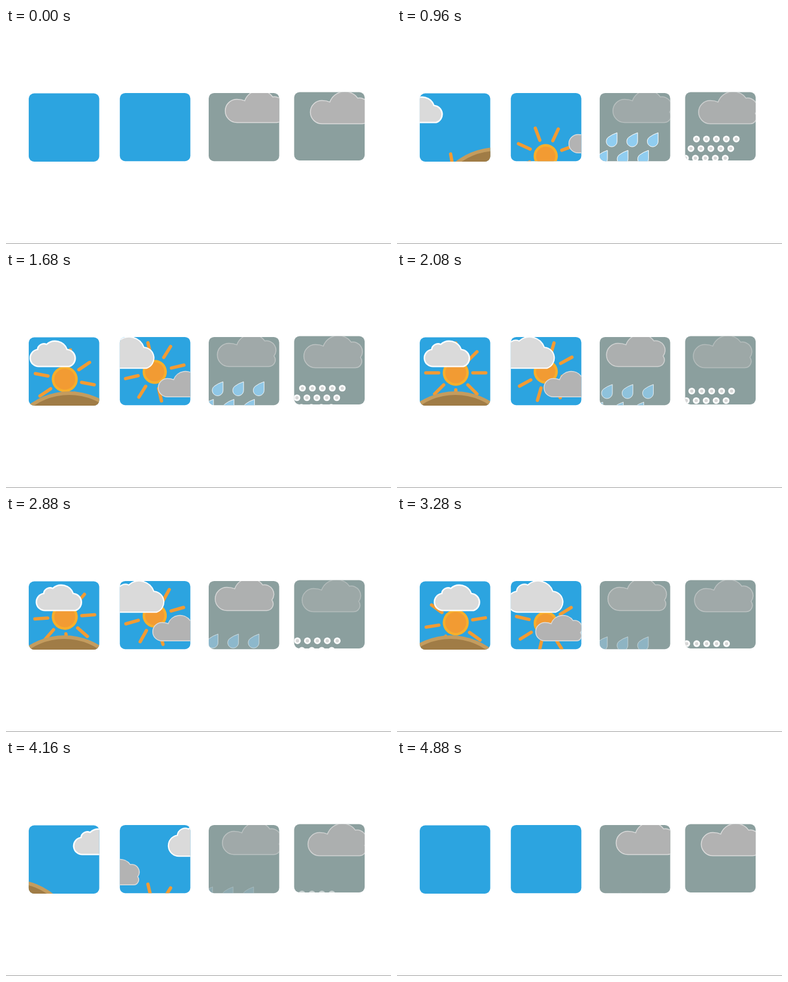
Write an HTML page with a canvas that moves like this. It is 642 by 362 pixels and loops after 5.04 s.

```html
<!DOCTYPE html>
<html lang="en">
<head>
<meta charset="utf-8">
<title>Weather tiles</title>
<style>
html, body { margin: 0; width: 100%; height: 100%; overflow: hidden; background: #fff; }
canvas { display: block; }
</style>
</head>
<body>
<canvas id="stage" width="642" height="362"></canvas>
<script>
const ctx = document.getElementById('stage').getContext('2d');
const LOOP = 5040, STEP = 80, LAST = 4880;
const SKY = '#2ca4e0', OVERCAST = '#8b9f9e';
const ORANGE = '#f29b33', YELLOW = '#f8af2b';
const whiteCloud = new Path2D('M18.5 0A17.6 17.6 0 0 1 15.5 -35A13 13 0 0 1 34 -45.5A26 26 0 0 1 76 -35A18 18 0 0 1 80.5 0Z');
const grayCloud = new Path2D('M19.5 0A19.5 19.5 0 0 1 19.5 -39Q27 -39 32.5 -36.5A26.5 26.5 0 0 1 79 -43A16 16 0 0 1 94.5 -17.5A11 11 0 0 1 86 0Z');
const drop = new Path2D('M9 -14.5V0A9 9 0 1 1 -6 -6.7Q0 -11.5 9 -14.5Z');

const clamp = v => Math.max(0, Math.min(1, v));
const ease = (t, from, to) => (1 - Math.cos(Math.PI * clamp((t - from) / (to - from)))) / 2;
const wave = (t, cycles = 1) => (1 + Math.cos(2 * Math.PI * cycles * t / LOOP)) / 2;

function disc(x, y, r, color) {
  ctx.fillStyle = color;
  ctx.beginPath();
  ctx.arc(x, y, r, 0, 2 * Math.PI);
  ctx.fill();
}

function shape(path, x, y, scale, fill, stroke, width) {
  ctx.save();
  ctx.translate(x, y);
  ctx.scale(scale, scale);
  ctx.fillStyle = fill;
  ctx.strokeStyle = stroke;
  ctx.lineWidth = width / scale;
  ctx.fill(path);
  ctx.stroke(path);
  ctx.restore();
}

const white = (x, y, scale, width) => shape(whiteCloud, x, y, scale, '#dadada', '#fff', width);
const gray = (x, y, scale = 1) => shape(grayCloud, x, y, scale, '#b3b3b3', '#dcdcdc', 1.5);

function sun(x, y, r, degrees) {
  ctx.save();
  ctx.translate(x, y);
  ctx.rotate(degrees * Math.PI / 180);
  ctx.strokeStyle = ORANGE;
  ctx.lineWidth = 5.5;
  ctx.lineCap = 'round';
  ctx.beginPath();
  for (let i = 0; i < 8; i++) {
    ctx.moveTo(28.5, 0);
    ctx.lineTo(50, 0);
    ctx.rotate(Math.PI / 4);
  }
  ctx.stroke();
  disc(0, 0, r, YELLOW);
  disc(0, 0, r - 4.2, ORANGE);
  ctx.restore();
}

function tile(x, y, color, paint) {
  ctx.save();
  ctx.beginPath();
  ctx.roundRect(x, y, 117.6, 114.3, 9);
  ctx.fillStyle = color;
  ctx.fill();
  ctx.clip();
  paint();
  ctx.restore();
}

function sunrise(t) {
  const rise = 1 - ease(t, 0, 2000), set = ease(t, 2980, 4900);
  const turn = 67.5 * (1 - clamp(t / 2000)) - 16 * Math.max(0, (t - 2080) / 1600) ** 2;
  sun(98, 169 + 172 * rise + 160 * set, 21.7, turn);
  const hill = 97.3 + 130 * (rise - set);
  disc(hill, 311, 111, '#c49c5e');
  disc(hill, 311, 105, '#a07c46');
  const drift = 5 * Math.max(0, (t - 2400) / 480) ** 2;
  white(45.2 - 85.5 * rise + drift, 158.4, .815, 2.4);
}

function cloudy(t) {
  const away = 1 - ease(t, 0, 2200), leave = ease(t, 2880, 4880);
  const dip = 1 - ease(t, 0, 1740) + ease(t, 2880, 4720);
  sun(248, 167 + 114 * dip, 20.2, 360 * t / 4960);
  white(170.5 - 126 * away + 140 * leave, 161.2, 1, 2);
  gray(244.7 + 70 * away - 140 * leave, 209.3, .79);
}

function rain(t) {
  ctx.globalAlpha = clamp(Math.min(t / 900, (5000 - t) / 3800));
  const x = 364.7 - .007 * t, y = 178.9 + .0116 * t;
  for (let row = 0; row < 2; row++)
    for (let col = 0; col < 3; col++)
      shape(drop, x + 34.2 * col - 16 * row, y + 29.5 * row, 1, '#90cdf0', '#fff', 1);
  ctx.globalAlpha = .4 + .6 * wave(t, 2);
  gray(348 + 17.6 * wave(t), 158.4);
}

function snow(t) {
  ctx.globalAlpha = clamp(Math.min(t / 900, (5000 - t) / 1600));
  const x = 506.1 - .007 * t, y = 174.6 + .012 * t;
  for (let row = 0; row < 3; row++)
    for (let col = 0; col < 5; col++) {
      const cx = x + 16.6 * col - 9.2 * row, cy = y + 16 * row;
      disc(cx, cy, 5.6, '#fff');
      disc(cx, cy, 2.8, '#d6d6d6');
    }
  ctx.globalAlpha = .4 + .6 * wave(t);
  gray(493 + 14.5 * wave(t), 160.6);
}

function draw(now) {
  const t = Math.min(LAST, Math.floor(now % LOOP / STEP) * STEP);
  ctx.fillStyle = '#fff';
  ctx.fillRect(0, 0, 642, 362);
  ctx.fillStyle = '#a0a0a0';
  ctx.fillRect(0, 361, 642, 1);
  tile(37.9, 109.6, SKY, () => sunrise(t));
  tile(189.8, 108.9, SKY, () => cloudy(t));
  tile(338, 108.9, OVERCAST, () => rain(t));
  tile(480.5, 107.6, OVERCAST, () => snow(t));
}

function frame() {
  draw(performance.now());
  requestAnimationFrame(frame);
}
frame();
</script>
</body>
</html>
```
